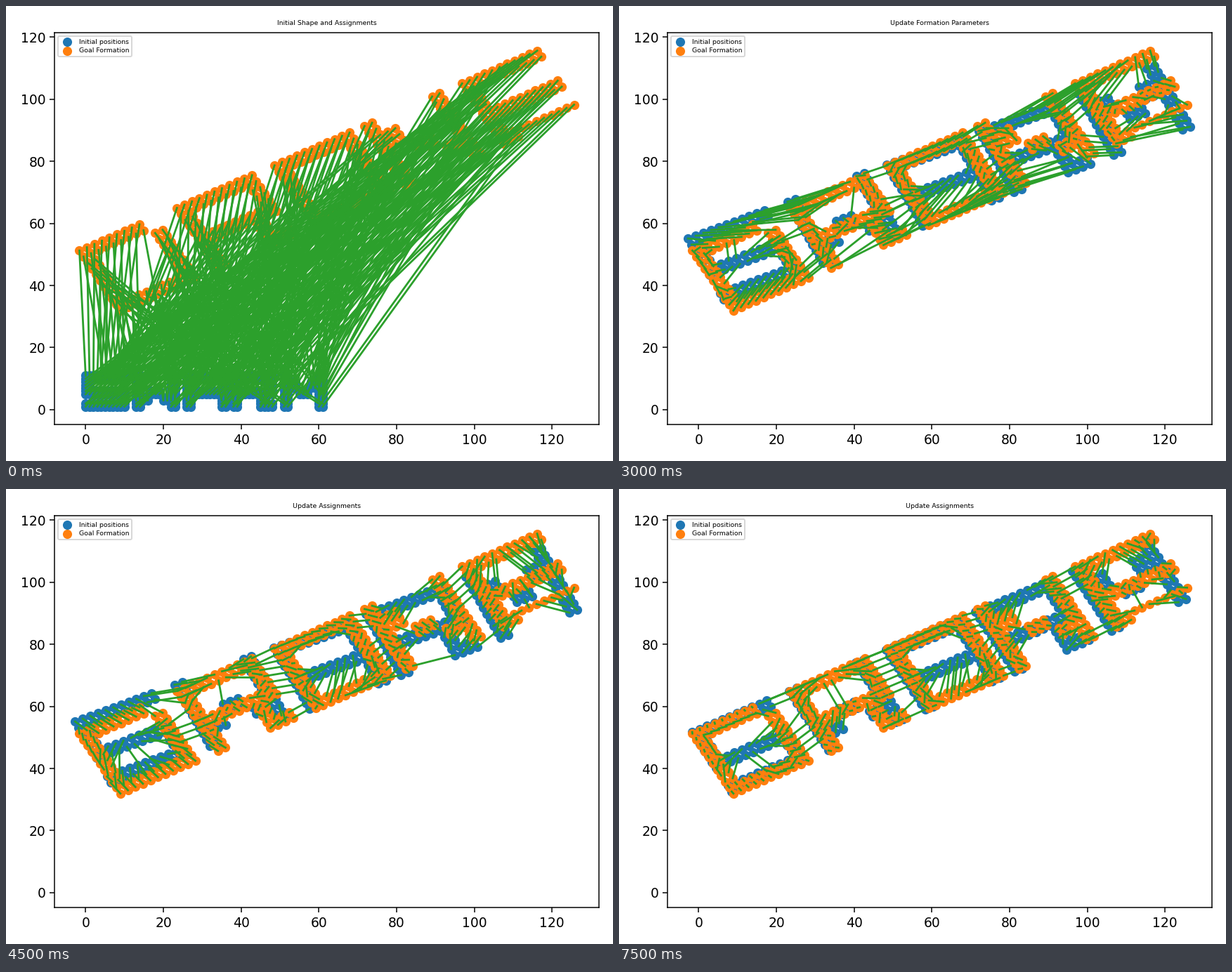
Animation of 864x648 px, one loop 8 s. Source, as a matplotlib script:

```python
import numpy as np
import matplotlib.pyplot as plt
from matplotlib.animation import FuncAnimation
from matplotlib.collections import LineCollection

# Strokes on an 11 x 11 cell: first/last column, first/last row (row 0 on top)
TOP, MID, BASE = (0, 10, 0, 1), (0, 10, 5, 6), (0, 10, 9, 10)
LEFT, RIGHT = (0, 1, 0, 10), (9, 10, 0, 10)
GLYPHS = {
    "S": [TOP, MID, BASE, (0, 1, 0, 6), (9, 10, 5, 10)],
    "W": [LEFT, RIGHT, (2, 3, 7, 8), (4, 6, 5, 6), (7, 8, 7, 8)],
    "A": [TOP, MID, LEFT, RIGHT],
    "R": [TOP, MID, LEFT, (9, 10, 0, 6), (7, 8, 7, 10), (7, 10, 9, 10)],
    "M": [LEFT, RIGHT, (2, 3, 2, 4), (4, 6, 5, 6), (7, 8, 2, 4)],
    "D": [LEFT, BASE, (0, 8, 0, 1), (9, 10, 2, 10)],
    "O": [TOP, BASE, LEFT, RIGHT],
    "N": [LEFT, RIGHT, (2, 3, 2, 4), (4, 6, 5, 6), (7, 8, 7, 8)],
    "E": [TOP, MID, BASE, LEFT],
}
STARTS = (0, 13, 26, 38, 51)


def word_points(word):
    """Points of a word as complex numbers, row by row from the top."""
    grid = np.zeros((11, 62), bool)
    for start, letter in zip(STARTS, word):
        for c0, c1, r0, r1 in GLYPHS[letter]:
            grid[r0:r1 + 1, start + c0:start + c1 + 1] = True
    rows, cols = np.nonzero(grid)
    return cols + 1j * (11 - rows)


def assign(p, q):
    """Hungarian method on squared distances: index into q for each p."""
    cost = np.abs(p[:, None] - q[None, :]) ** 2
    n = len(p)
    u, v = np.zeros(n + 1), np.zeros(n + 1)
    v[1:] = cost.min(axis=0)
    match, way = np.zeros(n + 1, int), np.zeros(n + 1, int)
    for i in range(1, n + 1):
        match[0], j = i, 0
        low = np.full(n + 1, np.inf)
        used = np.zeros(n + 1, bool)
        while True:
            used[j] = True
            row = match[j]
            reduced = cost[row - 1] - u[row] - v[1:]
            better = ~used[1:] & (reduced < low[1:])
            low[1:][better] = reduced[better]
            way[1:][better] = j
            nxt = 1 + int(np.argmin(np.where(used[1:], np.inf, low[1:])))
            delta = low[nxt]
            u[match[used]] += delta
            v[used] -= delta
            low[~used] -= delta
            j = nxt
            if match[j] == 0:
                break
        while j:
            prev = way[j]
            match[j] = match[prev]
            j = prev
    order = np.empty(n, int)
    order[match[1:] - 1] = np.arange(n)
    return order


def fit(p, q):
    """Best rotation of p onto q, with the scale taken from the spreads."""
    pc, qc = p - p.mean(), q - q.mean()
    turn = np.exp(1j * np.angle(np.vdot(pc, qc)))
    return qc.std() / pc.std() * turn * pc + q.mean()


def xy(z):
    return np.column_stack([z.real, z.imag])


start = word_points("SWARM")
goal = word_points("DRONE")
count = min(len(start), len(goal))
start, goal = start[:count], goal[:count]
goal = 2.2 * np.exp(0.5j) * goal + (10 + 30j)

# Alternate between matching points and refitting the formation
stages = [("Initial Shape and Assignments", start, np.arange(count))]
points = start
for step in range(3):
    order = assign(points, goal)
    stages.append(("Update Assignments", points, order))
    if step < 2:
        points = fit(start, goal[order])
        stages.append(("Update Formation Parameters", points, order))

fig, ax = plt.subplots(figsize=(6.4, 4.8), dpi=135)
fig.subplots_adjust(left=0.0802, right=0.9766, bottom=0.0804, top=0.9409)
dots = ax.scatter(start.real, start.imag, color="C0", label="Initial positions")
ax.scatter(goal.real, goal.imag, color="C1", label="Goal Formation")
both = np.concatenate([start, goal])
for values, set_lim in ((both.real, ax.set_xlim), (both.imag, ax.set_ylim)):
    pad = 0.05 * np.ptp(values)
    set_lim(values.min() - pad, values.max() + pad)
links = LineCollection([], colors="C2", linewidths=1.5, zorder=2,
                       capstyle="projecting")
ax.add_collection(links, autolim=False)
ax.legend(loc="upper left", fontsize=5, labelspacing=0.4)
title = ax.set_title(stages[0][0], fontsize=5)


def update(i):
    text, pts, order = stages[i // 3]
    title.set_text(text)
    dots.set_offsets(xy(pts))
    links.set_segments(np.stack([xy(pts), xy(goal[order])], axis=1))
    return title, dots, links


anim = FuncAnimation(fig, update, frames=16, interval=500, repeat=True,
                     repeat_delay=0, blit=False)
plt.show()
```
